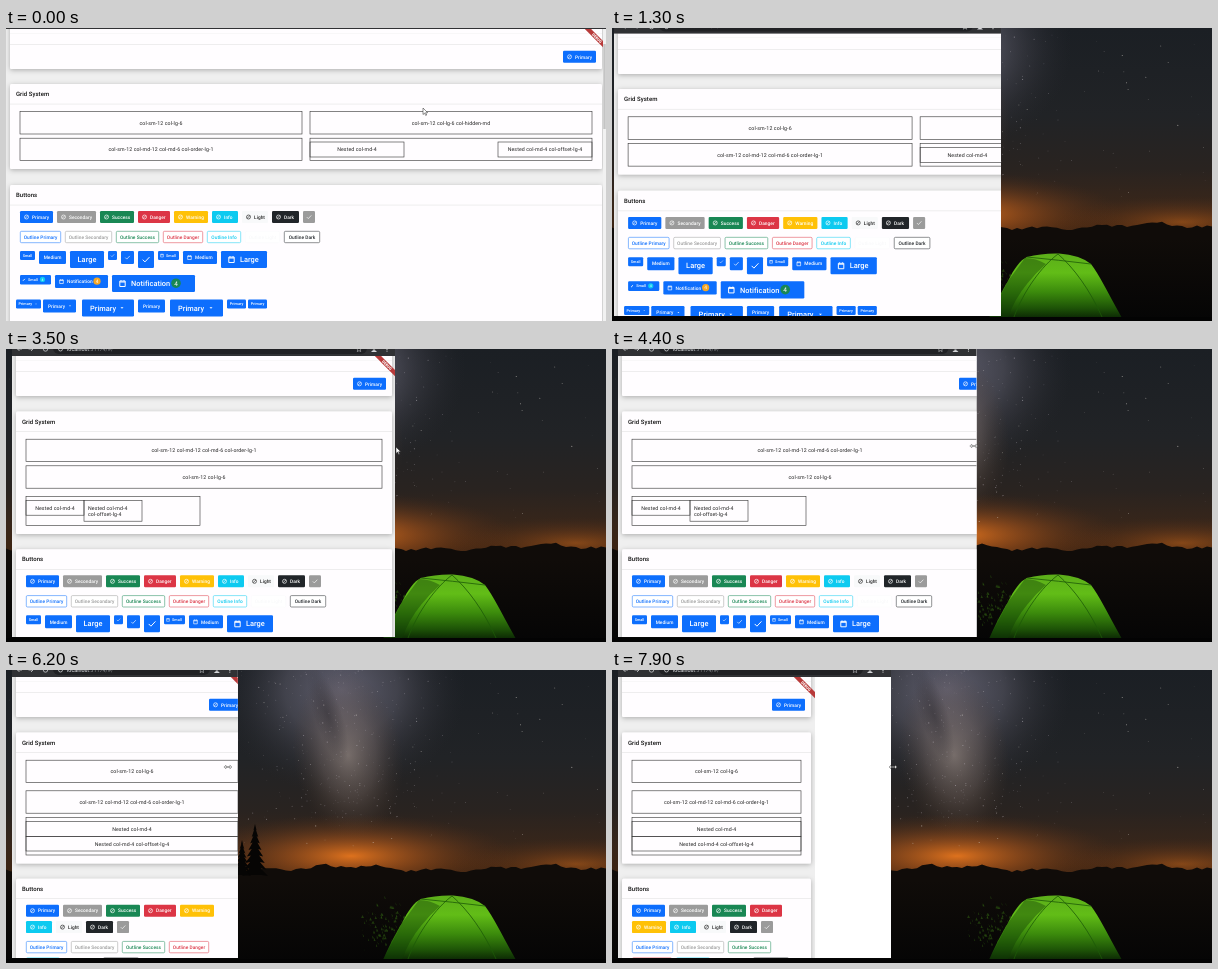
Animation of 600x293 px, one loop 8000 ms. Source, as an HTML page:

```html
<!DOCTYPE html>
<html lang="en">
<head>
<meta charset="utf-8">
<title>Responsive window</title>
<style>
html, body { margin: 0; width: 100%; height: 100%; overflow: hidden; background: #000; }
svg { display: block; width: 100vw; height: 100vh; }
text { font-family: Roboto, sans-serif; text-rendering: geometricPrecision; }
</style>
</head>
<body>
<svg id="stage" viewBox="0 0 600 293" preserveAspectRatio="none"></svg>
<script>
const LOOP = 8000;
const BLUE = '#0d6efd', GREY = '#9b9b9b', GREEN = '#198754', RED = '#dc3545',
      YELLOW = '#ffc107', CYAN = '#0dcaf0', LIGHT = '#f8f9fa', DARK = '#212529';

// ---------- drawing helpers ----------
const rect = (x, y, w, h, fill, more = '') =>
  `<rect x="${x}" y="${y}" width="${w}" height="${h}" fill="${fill}" ${more}/>`;
const path = (d, fill, more = '') => `<path d="${d}" fill="${fill}" ${more}/>`;
const ellipse = (x, y, rx, ry, fill, more = '') =>
  `<ellipse cx="${x}" cy="${y}" rx="${rx}" ry="${ry}" fill="${fill}" ${more}/>`;
const text = (x, y, s, size, fill, anchor = 'start', more = '') =>
  `<text x="${x}" y="${y + size * 0.355}" font-size="${size}" fill="${fill}" text-anchor="${anchor}" ${more}>${s}</text>`;
const body = (x, y, s, anchor = 'middle') =>
  text(x, y, s, 5.23, '#222', anchor, 'letter-spacing=".093"');
const box = (x, y, w, h) => rect(x, y, w, h, 'none', 'stroke="#333" stroke-width=".6"');

const icons = {
  ban: '<circle r="2"/><path d="M-1.4-1.4L1.4 1.4" transform="scale(-1 1)"/>',
  check: '<path d="M-2.2 .1L-.7 1.6L2.3-1.6"/>',
  cal: '<path d="M-1.8-1.6H1.8V2H-1.8ZM-1.8-1H1.8M-1-2.2V-1.6M1-2.2V-1.6"/>',
  pen: '<path d="M-1.4 1.4L1.2-1.2" stroke-width="1.2"/>'
};
const icon = (name, x, y, k, color) =>
  `<g transform="translate(${x} ${y}) scale(${k})" fill="none" stroke="${color}" stroke-width=".65">${icons[name]}</g>`;

// Metrics by button height: icon x, label x, font size, icon scale, caret label x, caret inset
const metrics = h => h < 10 ? [4, 8, 3.8, .75, 2.5, 5]
  : h < 15 ? [6.5, 12, 4.8, 1, 5, 6]
  : [10.5, 19, 7.4, 1.5, 8, 12];

function button(x, y, { label = '', w, h = 12, fill = BLUE, ico, outline, caret, badge }) {
  const [ix, tx, size, k, cx, inset] = metrics(h);
  const ink = outline ? fill : fill === LIGHT ? '#222' : '#fff';
  const mid = y + h / 2;
  let s = outline
    ? rect(x + .3, y + .3, w - .6, h - .6, '#fff', `rx="1.2" stroke="${fill}" stroke-width=".5"`)
    : rect(x, y, w, h, fill, 'rx="1.2"');
  if (ico) s += icon(ico, label ? x + ix : x + w / 2, mid, k, ink);
  const weight = 'font-weight="500" letter-spacing=".03"';
  if (label) s += ico ? text(x + tx, mid, label, size, ink, 'start', weight)
    : caret ? text(x + cx, mid, label, size, ink, 'start', weight)
    : text(x + w / 2, mid, label, size, ink, 'middle', weight);
  if (caret) s += path(`M${x + w - inset - k} ${mid - k / 2}h${2 * k}l${-k} ${k}z`, '#fff');
  if (badge) {
    const [bx, r, color] = badge;
    s += `<circle cx="${x + bx}" cy="${mid - .3}" r="${r}" fill="${color}"/>` +
      text(x + bx, mid - .3, '4', r * 1.35, '#fff', 'middle');
  }
  return s;
}

// Places items left to right and wraps them at the limit
function flow(items, y, limit, gap) {
  let x = 14, tall = 0, out = '';
  for (const it of items) {
    if (x + it.w > limit + .5) { x = 14; y += tall + 4.4; tall = 0; }
    out += button(x, y, it);
    x += it.w + 4;
    tall = Math.max(tall, it.h || 12);
  }
  return [out, y + tall + gap];
}

const solid = [['Primary', 33, BLUE], ['Secondary', 39, GREY], ['Success', 34, GREEN], ['Danger', 32, RED],
  ['Warning', 34, YELLOW], ['Info', 26, CYAN], ['Light', 26, LIGHT], ['Dark', 27, DARK]]
  .map(([label, w, fill]) => ({ label, w, fill, ico: 'ban' }))
  .concat({ w: 12, fill: GREY, ico: 'check' });
const outlineWidths = [41, 47, 43, 40, 34, 35, 36];
const outlined = solid.slice(0, 4).concat(solid.slice(5, 8))
  .map((b, i) => ({ label: 'Outline ' + b.label, w: outlineWidths[i], fill: b.fill, outline: true }));
const sizes = [['Small', 15, 9], ['Medium', 27, 13], ['Large', 34, 17],
  ['', 9, 9, 'check'], ['', 13, 13, 'check'], ['', 16, 17, 'check'],
  ['Small', 21, 9, 'cal'], ['Medium', 34, 13, 'cal'], ['Large', 46, 17, 'cal']]
  .map(([label, w, h, ico]) => ({ label, w, h, ico }));
const notices = [
  { label: 'Small', w: 31, h: 9.5, ico: 'pen', badge: [22.5, 2.6, CYAN] },
  { label: 'Notification', w: 53, h: 13, ico: 'cal', badge: [42, 3.6, '#f5a623'] },
  { label: 'Notification', w: 83, h: 17, ico: 'cal', badge: [64, 4.8, GREEN] }
];
const menus = [[10, 25, 9, 1], [37, 33, 13, 1], [76, 52, 17, 1], [132, 27, 13], [164, 53, 17, 1], [221, 19, 9], [242, 19, 9]];

// ---------- web page ----------
function card(y, h, W, title) {
  let s = rect(4, y, W - 8, h, '#fffdff', 'rx="1.5" filter="url(#shade)"');
  if (title) s += text(10, y + 10, title, 5.97, '#111', 'start', 'font-weight="500" letter-spacing=".056"') +
    rect(4, y + 19.8, W - 8, .5, '#ddd');
  return s;
}

function grid(W) {
  const full = W - 28, half = (full - 8) / 2, right = 22 + half;
  const a = 'col-sm-12 col-lg-6', b = 'col-sm-12 col-md-12 col-md-6 col-order-lg-1';
  const n1 = 'Nested col-md-4', n2 = n1 + ' col-offset-lg-4';
  const cell = (x, y, w, s, h = 22.4) => box(x, y, w, h) + body(x + w / 2, y + h / 2, s);
  if (W > 500) {
    const third = half / 3;
    return card(56, 85, W, 'Grid System') +
      cell(14, 83.6, half, a) + cell(right, 83.6, half, a + ' col-hidden-md') +
      cell(14, 110.2, half, b) + box(right, 110.2, half, 22.4) +
      cell(right, 114, third, n1, 15) + cell(right + 2 * third, 114, third, n2, 15);
  }
  if (W > 300) {
    const third = half / 3, x2 = 14 + third;
    return card(56.5, 122.5, W, 'Grid System') +
      cell(14, 84.2, full, b) + cell(14, 110.8, full, a) +
      box(14, 141.5, half, 29) + cell(14, 145.5, third, n1, 14.7) +
      box(x2, 145.5, third, 20.7) +
      body(x2 + 4, 152.8, n1, 'start') + body(x2 + 4, 159, 'col-offset-lg-4', 'start');
  }
  return card(56.5, 131, W, 'Grid System') +
    cell(14, 84.2, full, a) + cell(14, 114.8, full, b) +
    box(14, 141.5, full, 37.5) + cell(14, 145.6, full, n1, 14.7) + cell(14, 160.3, full, n2, 14.7);
}

function page(W) {
  const top = W > 500 ? 157 : W > 300 ? 194.3 : 202.7;
  let s = rect(0, 1, W, 300, '#efefef');
  s += card(-20, 61, W) + rect(4, 5, W - 8, .4, '#eee') + rect(4, 16.3, W - 8, .5, '#ddd');
  s += button(W - 43, 22.8, solid[0]);
  s += grid(W) + card(top, 200, W, 'Buttons');
  let y = top + 26, part;
  for (const [items, gap] of [[solid, 8], [outlined, 8], [sizes, 7], [notices, 7.5]]) {
    [part, y] = flow(items, y, W - 14, gap);
    s += part;
  }
  for (const [x, w, h, caret] of menus) s += button(x, y, { label: 'Primary', w, h, caret });
  s += path(`M${W - 21.2} 1h6.3L${W} 15.9v6.3z`, '#b83a3a') +
    `<g transform="translate(${W - 9} 10) rotate(45)">` +
    text(0, 0, 'DEBUG', 3.8, '#fff', 'middle', 'font-weight="900"') + '</g>';
  if (W > 500) s += rect(597, 1, 3, 292, '#f1f1f1') + rect(597.3, 16, 2.4, 85, '#c4c4c4');
  return `<g id="p${W}">${s}</g>`;
}

// ---------- wallpaper ----------
function conifer(x, top, base, spread) {
  const h = base - top, side = dir => {
    const pts = [];
    for (let i = 1; i <= 8; i++) {
      const w = dir * spread * i / 8, y = top + h * i / 8;
      pts.push(`${x + w} ${y}`, `${x + w * .5} ${y - 1}`);
    }
    return pts;
  };
  return path(`M${x} ${top}L${side(1).join('L')}L${side(-1).reverse().join('L')}z`, '#060504');
}

function wallpaper() {
  let seed = 7;
  const rnd = () => (seed = seed * 16807 % 2147483647) / 2147483647;
  const bell = () => rnd() + rnd() + rnd() - 1.5;
  const dot = (x, y, r, fill, a) =>
    `<circle cx="${x.toFixed(1)}" cy="${y.toFixed(1)}" r="${r.toFixed(2)}" fill="${fill}" opacity="${a.toFixed(2)}"/>`;

  let s = rect(0, 0, 600, 293, 'url(#sky)') +
    ellipse(335, 20, 125, 105, 'url(#milk)') +
    ellipse(342, 85, 55, 85, 'url(#dust)', 'transform="rotate(-8 342 85)"') +
    ellipse(322, 45, 14, 50, 'url(#lane)', 'transform="rotate(-18 322 45)"') +
    ellipse(345, 186, 165, 42, 'url(#glow)') +
    ellipse(570, 194, 130, 26, 'url(#glow)', 'opacity=".45"');
  for (let i = 0; i < 260; i++) {
    const y = rnd() * 150;
    s += dot(335 + y * .1 + bell() * 85, y, .25 + rnd() * .3, '#c9c3cc', .2 + rnd() * .4);
  }
  for (let i = 0; i < 130; i++)
    s += dot(rnd() * 600, rnd() * 180, .2 + rnd() * .4, '#d8d2cc', .2 + rnd() * .5);

  let ridge = 'M0 293V200';
  for (let x = 0; x <= 600; x += 5)
    ridge += `L${x} ${(197 + 2.5 * Math.sin(x / 31) + 1.5 * Math.sin(x / 9 + 1) + rnd() * 3).toFixed(1)}`;
  s += path(ridge + 'V293z', '#100c09') + rect(0, 210, 600, 83, 'url(#ground)') +
    conifer(249, 154, 206, 13) + conifer(236, 170, 206, 9);

  for (let i = 0; i < 110; i++) {
    const x = 380 + bell() * 22, y = 257 + bell() * 22;
    s += path(`M${x.toFixed(1)} ${y.toFixed(1)}l${(rnd() * 4 - 2).toFixed(1)} -3l1.5 3z`, '#2f5a12', 'opacity=".6"');
  }
  const shell = 'M377 290C383 276 390 263 396 253C402 241 408 232 415 229Q430 225 447 225.500Q468 227 479 236C488 248 497 267 510 290z';
  s += path(shell, 'url(#tent)') +
    path('M413 230L396 253L377 290H396Q405 262 434 236Q424 230 413 230z', '#0f3a05', 'opacity=".4"') +
    path('M446 226C430 238 412 262 402 289M446 226C462 240 478 262 490 289M415 229Q446 232 479 236', 'none',
      'stroke="#1d5a08" stroke-width=".8"') +
    rect(0, 289, 600, 4, '#030303');
  return s;
}

const stop = (o, c, a = 1) => `<stop offset="${o}" stop-color="${c}" stop-opacity="${a}"/>`;
const defs = `<defs>
<linearGradient id="sky" x2="0" y2="1">${stop(0, '#1b1f24')}${stop(.3, '#212326')}${stop(.48, '#292320')}${stop(.6, '#38261a')}${stop(.67, '#3c2413')}</linearGradient>
<linearGradient id="ground" x2="0" y2="1">${stop(0, '#100c09')}${stop(1, '#050505')}</linearGradient>
<radialGradient id="milk">${stop(0, '#6e6c7e', .85)}${stop(.45, '#5a5966', .6)}${stop(1, '#2a2a30', 0)}</radialGradient>
<radialGradient id="dust">${stop(0, '#94867f', .7)}${stop(.5, '#7a6a64', .4)}${stop(1, '#4a382c', 0)}</radialGradient>
<radialGradient id="lane">${stop(0, '#2c2a30', .5)}${stop(1, '#2c2a30', 0)}</radialGradient>
<radialGradient id="glow">${stop(0, '#f07a1e', .9)}${stop(.4, '#b45a1c', .55)}${stop(1, '#5a3018', 0)}</radialGradient>
<linearGradient id="tent" x2="0" y2="1">${stop(0, '#5cae1a')}${stop(.3, '#62bd17')}${stop(.6, '#3b8a0c')}${stop(.85, '#1d5207')}${stop(1, '#0c2804')}</linearGradient>
<filter id="shade" x="-5%" y="-20%" width="110%" height="150%"><feDropShadow dx="0" dy="1.2" stdDeviation="2.8" flood-opacity=".28"/></filter>
<clipPath id="frame"><rect id="clip" y="0"/></clipPath></defs>`;

const toolbar = `<g id="bar">${rect(0, -20, 600, 27, '#303134')}<rect id="pill" x="47" y="-8" height="13" rx="6" fill="#202124"/>
<g fill="none" stroke="#c8c9cc" stroke-width=".8"><path d="M16 0h-4.5l2-2m-2 2l2 2M22.500 0h4.500l-2-2m2 2l-2 2"/><circle cx="39.500" cy="0" r="2.200"/><circle cx="54.500" cy="0" r="2"/></g>
${text(61, -.2, 'localhost<tspan fill="#8c8f93">:51174/#/</tspan>', 5.4, '#e8eaed')}
<g id="tools" fill="#d5d6d9"><path d="M-36-2.500l.8 1.700 1.900.2-1.400 1.300.4 1.900-1.700-1-1.700 1 .4-1.900-1.400-1.300 1.900-.2z" fill="none" stroke="#d5d6d9" stroke-width=".5"/><circle cx="-21" cy="-1" r="1.500"/><path d="M-24 3q3-4 6 0z"/><circle cx="-8" cy="-1.500" r=".6"/><circle cx="-8" cy=".3" r=".6"/><circle cx="-8" cy="2.100" r=".6"/></g></g>`;

const widths = [600, 384, 240, 197];
const stage = document.getElementById('stage');
stage.innerHTML = defs + wallpaper() +
  `<g clip-path="url(#frame)">${rect(0, 0, 600, 293, '#fff')}<g id="page">${widths.map(page).join('')}</g>${toolbar}</g>` +
  `<path id="arrow" d="M0 0V6.500L1.600 5.100 2.700 7.500 3.700 7 2.600 4.700H4.700z" fill="#fff" stroke="#222" stroke-width=".5"/>
   <path id="sizer" d="M-4 0l2-1.700v1.200H2v-1.200L4 0 2 1.700V.5H-2v1.200z" fill="#fff" stroke="#222" stroke-width=".4"/>`;

// ---------- motion ----------
const $ = id => document.getElementById(id);
const set = (el, attrs) => { for (const k in attrs) el.setAttribute(k, attrs[k]); };

function track(keys, t) {
  let i = 0;
  while (i < keys.length - 1 && keys[i + 1][0] <= t) i++;
  const a = keys[i], b = keys[i + 1];
  if (!b || t <= a[0]) return a.slice(1);
  const p = (t - a[0]) / (b[0] - a[0]);
  return a.slice(1).map((v, j) => v + (b[j + 1] - v) * p);
}

const pointer = [[0, 417, 80], [80, 417, 80], [300, 525, 1], [500, 560, -14], [1500, 560, -14], [2200, 392, 99],
  [2900, 392, 99], [3200, 390, 98], [4000, 390, 98], [4250, 392, 97], [4600, 322, 97], [4900, 249, 97],
  [5950, 249, 97], [6200, 222, 97], [6400, 205, 97], [7400, 205, 97], [7900, 281, 97]];
const edge = [[0, 389], [4280, 389], [4620, 320], [4900, 247], [6000, 247], [6200, 232], [6400, 203],
  [7420, 203], [7900, 279]];
// Page origin and zoom
const origin = [[1200, 2, 4.6, 1.007], [1350, 2, 4.6, 1.007], [1450, 6, 6, 1]];

function draw(t) {
  const maxed = t < 1200;
  const [ox, oy, k] = maxed ? [0, 0, 1] : track(origin, t);
  const right = maxed ? 600 : track(edge, t)[0];
  set($('clip'), { x: ox, width: right - ox, height: maxed ? 293 : 288 });
  set($('page'), { transform: `translate(${ox} ${oy}) scale(${k})` });
  set($('bar'), { transform: `translate(0 ${oy - 6})` });
  set($('pill'), { width: right - 75 });
  set($('tools'), { transform: `translate(${right} 0)` });

  const W = t < 1500 ? 600 : t < 5200 ? 384 : t < 6700 ? 240 : 197;
  for (const w of widths) set($('p' + w), { display: w === W ? 'inline' : 'none' });

  const [x, y] = track(pointer, t);
  const sizing = (t >= 2150 && t < 3000) || t >= 4100;
  set($('arrow'), { transform: `translate(${x} ${y})`, display: sizing ? 'none' : 'inline' });
  set($('sizer'), { transform: `translate(${x} ${y})`, display: sizing ? 'inline' : 'none' });
}

const start = performance.now();
function tick() {
  draw((performance.now() - start) % LOOP);
  requestAnimationFrame(tick);
}
tick();
</script>
</body>
</html>
```
